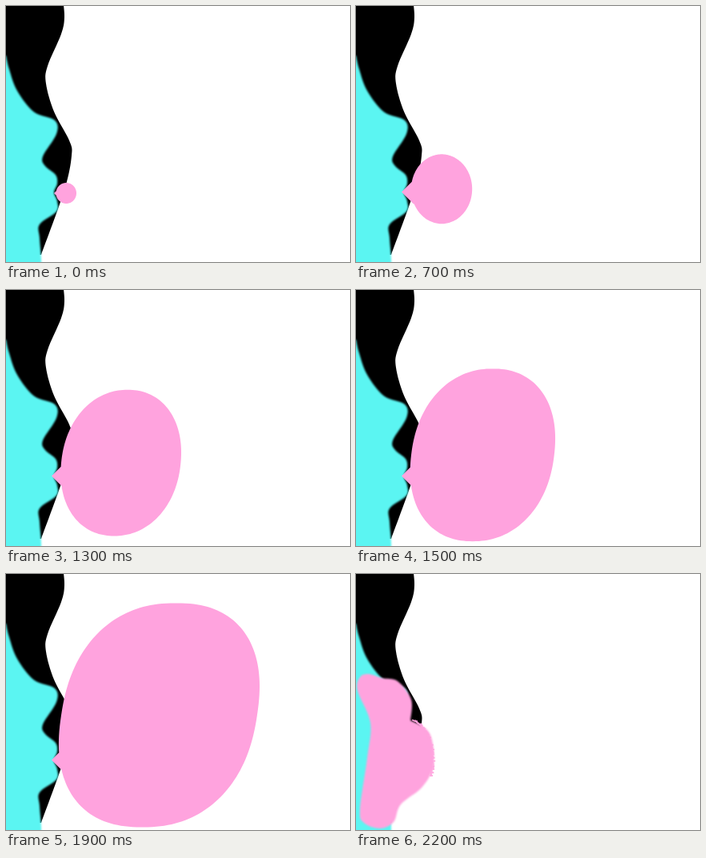
Write an HTML page with a canvas that moves like this. It is 430 px wide and 320 px high and loops after 2300 ms.

```html
<!DOCTYPE html>
<html lang="en">
<head>
<meta charset="utf-8">
<title>Bubble gum</title>
<style>
html, body { margin: 0; width: 100%; height: 100%; overflow: hidden; background: #fff; }
canvas { display: block; }
</style>
</head>
<body>
<canvas id="stage" width="430" height="320"></canvas>
<script>
const ctx = document.getElementById('stage').getContext('2d');
const STEP = 100, STEPS = 23;
const PINK = '#ffa3de', CYAN = '#5bf5f2';
const { PI, abs, cos, sin, sign, max, min } = Math;

// Smooth curve through a few points
function curve(pts, closed) {
  const n = pts.length / 2;
  const at = i => {
    const j = closed ? (i + n) % n : max(0, min(n - 1, i));
    return [pts[2 * j], pts[2 * j + 1]];
  };
  const path = new Path2D();
  path.moveTo(...at(0));
  for (let i = 0; i < (closed ? n : n - 1); i++) {
    const [a, b, c, d] = [at(i - 1), at(i), at(i + 1), at(i + 2)];
    path.bezierCurveTo(
      b[0] + (c[0] - a[0]) / 6, b[1] + (c[1] - a[1]) / 6,
      c[0] - (d[0] - b[0]) / 6, c[1] - (d[1] - b[1]) / 6, c[0], c[1]);
  }
  return path;
}

// Area between a curve and the left side of the stage
function leftOf(pts) {
  const path = curve(pts);
  path.lineTo(-9, pts[pts.length - 1]);
  path.lineTo(-9, pts[1]);
  return path;
}

function random(seed) {
  return () => (seed = seed * 16807 % 2147483647) / 2147483647;
}

function paint(path, color, soft) {
  ctx.filter = `blur(${soft}px)`;
  ctx.fillStyle = color;
  ctx.fill(path);
  ctx.filter = 'none';
}

const hair = leftOf([71,-9, 73,14, 69,35, 52,75, 50,97, 60,132, 79,168, 82,187, 73,230, 44,311]);
const face = leftOf([0,62, 4,79, 14,106, 35,132.5, 61,143, 63,160, 46,188, 49,200, 62,211,
  64,222, 60,233, 64,244, 63,257, 42,273, 42,290, 44,316, 44,335]);
const stuck = curve([56,288, 47,310, 30,318, 10,311, 5,294, 14,230, 18,186, 2,146, 5,129,
  16,125, 32,130, 52,134, 69,157, 68,183, 68,183, 92,199, 97,238, 83,266], true);

// The bubble is a leaning superellipse joined to the lips
function bubble(n) {
  const start = min(1, n / 4);
  const left = 62.5 + 6.5 * start;
  const right = 88 + 6 * n + 0.31 * n * n;
  const top = 221 - 2.4 * n - 0.385 * n * n;
  const bottom = 247 + 69.5 * (1 - cos(PI * min(1, n / 17))) / 2;
  const lean = max(0, n - 9) * 2.1;
  const power = 2 / (2 + lean * 0.015);
  const cx = (left + right) / 2, cy = (top + bottom) / 2;
  const bend = v => sign(v) * abs(v) ** power;

  const path = new Path2D();
  for (let a = 0; a < 2 * PI; a += PI / 90) {
    const x = bend(cos(a)), y = bend(sin(a));
    path.lineTo(cx + x * (right - left) / 2 - y * lean, cy + y * (bottom - top) / 2);
  }
  path.closePath();

  const lipX = 60 - 3 * start, lipY = 234 - 1.5 * start, size = 6 + 9 * start;
  path.moveTo(lipX, lipY);
  path.lineTo(lipX + size, lipY - size);
  path.lineTo(cx, cy);
  path.lineTo(lipX + size, lipY + size);
  path.closePath();
  paint(path, PINK, 0.5);
}

function burst(x, y, rx, ry, inner) {
  const rnd = random(11), pts = [];
  for (let i = 0; i < 40; i++) {
    const a = i * PI / 20;
    const r = i % 2 ? inner + rnd() * 0.08 : 1 - rnd() * 0.1;
    pts.push(x + rx * r * cos(a), y + ry * r * sin(a));
  }
  paint(curve(pts, true), PINK, 0.5);
}

function stuckGum() {
  paint(stuck, PINK, 0.8);
  // frayed right edge
  const rnd = random(71);
  for (let a = -1.3; a < 0.4; a += 0.04) {
    ctx.fillRect(61 + 33.5 * cos(a), 232 + 52 * sin(a), 2 + rnd() * 3, 1 + rnd());
  }
}

function draw(n) {
  ctx.fillStyle = '#fff';
  ctx.fillRect(0, 0, 430, 320);
  paint(hair, '#000', 0.5);
  paint(face, CYAN, 0.8);
  if (n < 20) bubble(n);
  else if (n === 20) burst(232, 180, 175, 140, 0.72);
  else if (n === 21) burst(105, 218, 100, 95, 0.84);
  else stuckGum();
}

const begin = performance.now();
function tick() {
  draw(Math.floor((performance.now() - begin) / STEP) % STEPS);
  requestAnimationFrame(tick);
}
tick();
</script>
</body>
</html>
```
